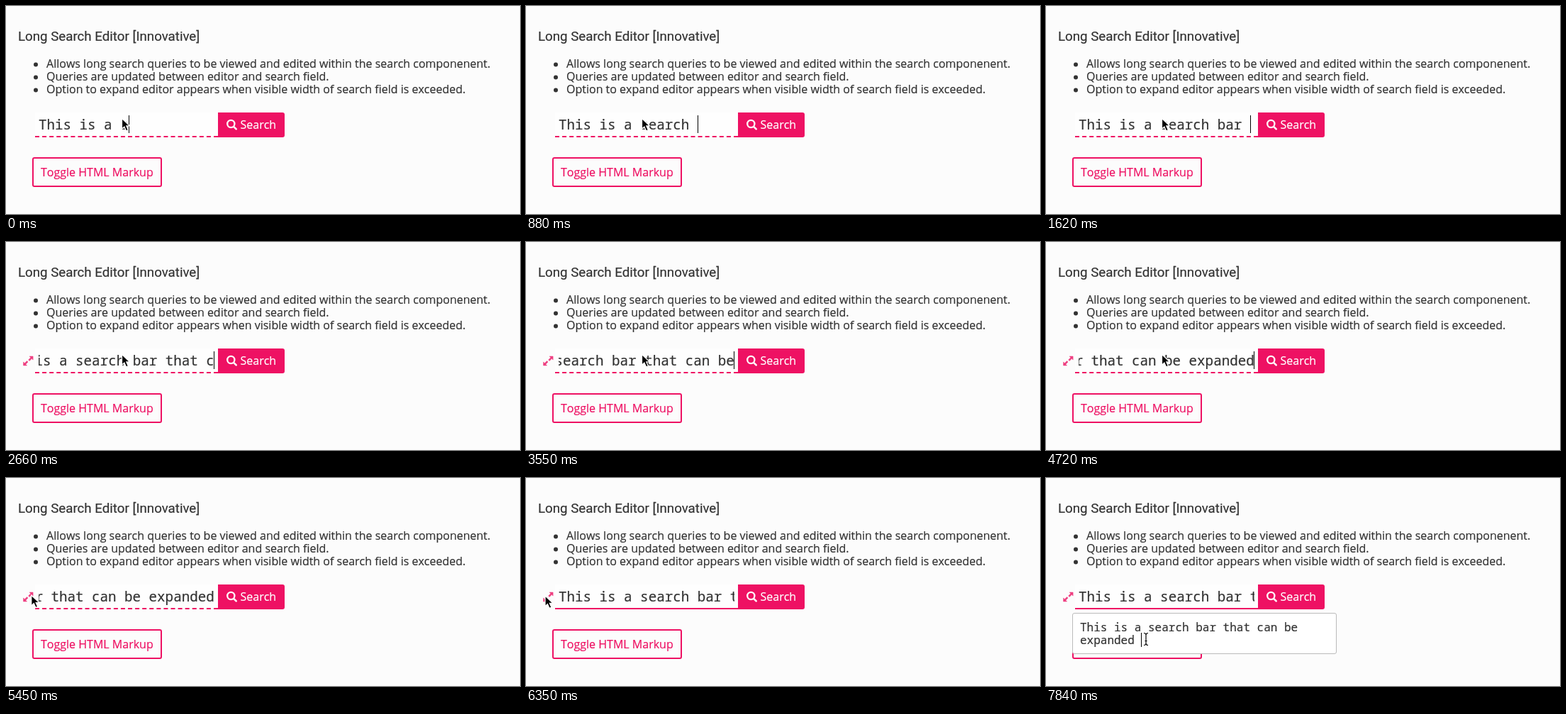
These frames come from a looping animation (725x293 px, 7.99 s). An HTML page:

```html
<!DOCTYPE html>
<html lang="en">
<head>
<meta charset="utf-8">
<title>Long Search Editor</title>
<style>
  html, body { margin: 0; width: 100%; height: 100%; overflow: hidden; background: #fcfcfc; }
  svg { display: block; width: 725px; height: 293px; color: #333; }
  text {
    font: 16px "Open Sans", sans-serif; font-kerning: none; white-space: pre;
    fill: currentColor; stroke: currentColor; stroke-width: .2px;
  }
  .title { font: 18.72px Roboto, sans-serif; }
  .mono { font-family: "Noto Sans Mono", monospace; }
  #query { font-size: 19.2px; }
  .pink { color: #ee1163; }
  .white { color: #fff; }
  #line { stroke: #ee1163; stroke-width: 2; }
  .dashed { stroke-dasharray: 6 4.08; }
  .off { display: none; }
</style>
</head>
<body>
<svg viewBox="0 0 725 293">
  <defs>
    <clipPath id="field"><rect x="46" y="150" width="248" height="33"/></clipPath>
    <path id="bar" d="M-3-8.5q3 0 3 2.5q0-2.5 3-2.5M0-6.5V6.5M-3 8.5q3 0 3-2.5q0 2.5 3 2.5M-1.5 2.5h3"/>
  </defs>

  <text class="title" x="17" y="49">Long Search Editor [Innovative]</text>
  <g fill="currentColor">
    <circle cx="42" cy="82.5" r="3"/>
    <circle cx="42" cy="100.5" r="3"/>
    <circle cx="42" cy="118.5" r="3"/>
  </g>
  <text x="57" y="87">Allows long search queries to be viewed and edited within the search componenent.</text>
  <text x="57" y="105">Queries are updated between editor and search field.</text>
  <text x="57" y="123">Option to expand editor appears when visible width of search field is exceeded.</text>

  <rect x="41" y="150" width="258" height="33" fill="#fefefe"/>
  <g clip-path="url(#field)"><text id="query" class="mono" y="174"></text></g>
  <path id="line" d="M41 184H299"/>
  <rect id="caret" y="154" width="1" height="25"/>

  <path fill="#ee1163" d="M299 150h91q3 0 3 3v29q0 3-3 3h-91z"/>
  <g fill="none" stroke="#fff" stroke-linecap="round">
    <circle cx="317.3" cy="166" r="5.1" stroke-width="2.3"/>
    <path d="M321.6 170.3l3.1 3.1" stroke-width="2.6"/>
  </g>
  <text class="white" x="330.5" y="173">Search</text>

  <g id="expand" fill="#ee3f80" stroke="#ee3f80" stroke-width=".5" stroke-linejoin="round">
    <path id="arrow" d="M33 161h5.1v5.1l-1.8-1.8-3.2 3.2-1.5-1.5 3.2-3.2z"/>
    <use href="#arrow" transform="rotate(180 31.3 167.5)"/>
  </g>

  <rect x="38" y="214" width="181" height="40" rx="2" fill="none" stroke="#ee1163" stroke-width="2"/>
  <text class="pink" x="49" y="240">Toggle HTML Markup</text>

  <g id="editor">
    <rect x="37.5" y="190.5" width="372" height="57" rx="2.5" fill="#fff" stroke="#bbb"/>
    <text class="mono" x="48" y="216">This is a search bar that can be</text>
    <text class="mono" x="48" y="234">expanded</text>
    <rect id="editCaret" y="218" width="1" height="20"/>
  </g>

  <path id="pointer" d="M0 0V14.6L3.4 11.4 6.1 17.4 8.9 16.2 6.3 10.4H11z" stroke="#fff" stroke-width="1.2"/>
  <g id="beam" fill="none">
    <use href="#bar" stroke="#fff" stroke-width="3"/>
    <use href="#bar" stroke="#000" stroke-width="1.2"/>
  </g>
</svg>
<script>
  // The screen refreshes once per tick; all times below are in ticks.
  const LOOP = 7990, TICK = 147.5;
  const CHAR = 11.52, LEFT = 46, RIGHT = 294;
  const GROW = 11, BLUR = 39, OPEN = 44, BEAM = 48, CLICK = 50, SPACE = 53;
  const phrase = "This is a search bar that can be expanded";

  const bursts = [
    { start: 0, end: 8, from: 11, to: 21 },
    { start: 11, end: 13, from: 23, to: 26 },
    { start: 18, end: 20, from: 27, to: 30 },
    { start: 23, end: 32, from: 31, to: 41 }
  ];
  const glides = [
    { start: 32, end: 37, dx: -142.5, dy: 7.5 },
    { start: 40, end: 43, dx: 6, dy: 0 },
    { start: 46, end: CLICK, dx: 114, dy: 61 }
  ];

  const $ = id => document.getElementById(id);
  const show = (id, on) => $(id).classList.toggle("off", !on);
  const progress = ({ start, end }, n) => Math.min(1, Math.max(0, (n - start) / (end - start)));
  const ease = p => p * p * (3 - 2 * p);

  function drawField(n) {
    const burst = bursts.findLast(b => b.start <= n);
    const count = Math.floor(burst.from + (burst.to - burst.from) * progress(burst, n));
    const focused = n < BLUR;
    const end = LEFT + count * CHAR;
    const idle = Math.max(0, n - burst.end);

    $("query").textContent = phrase.slice(0, count);
    $("query").setAttribute("x", focused ? LEFT - Math.max(0, end - RIGHT) : LEFT);
    $("line").classList.toggle("dashed", focused);
    $("caret").setAttribute("x", Math.min(Math.round(end), RIGHT - 1));
    show("caret", focused && Math.floor(idle / 3) % 2 === 0);
    show("expand", n >= GROW);
  }

  function drawEditor(n) {
    show("editor", n >= OPEN);
    show("editCaret", n >= CLICK);
    $("editCaret").setAttribute("x", n < SPACE ? 125 : 134);
  }

  function drawCursor(n) {
    let x = 163.5, y = 158.5;
    for (const g of glides) {
      const p = ease(progress(g, n));
      x += g.dx * p;
      y += g.dy * p;
    }
    for (const id of ["pointer", "beam"]) {
      $(id).setAttribute("transform", `translate(${x} ${y})`);
      show(id, (id === "beam") === (n >= BEAM));
    }
  }

  const origin = performance.now();
  function frame() {
    const n = Math.floor((performance.now() - origin) % LOOP / TICK);
    drawField(n);
    drawEditor(n);
    drawCursor(n);
    requestAnimationFrame(frame);
  }
  frame();
</script>
</body>
</html>
```
